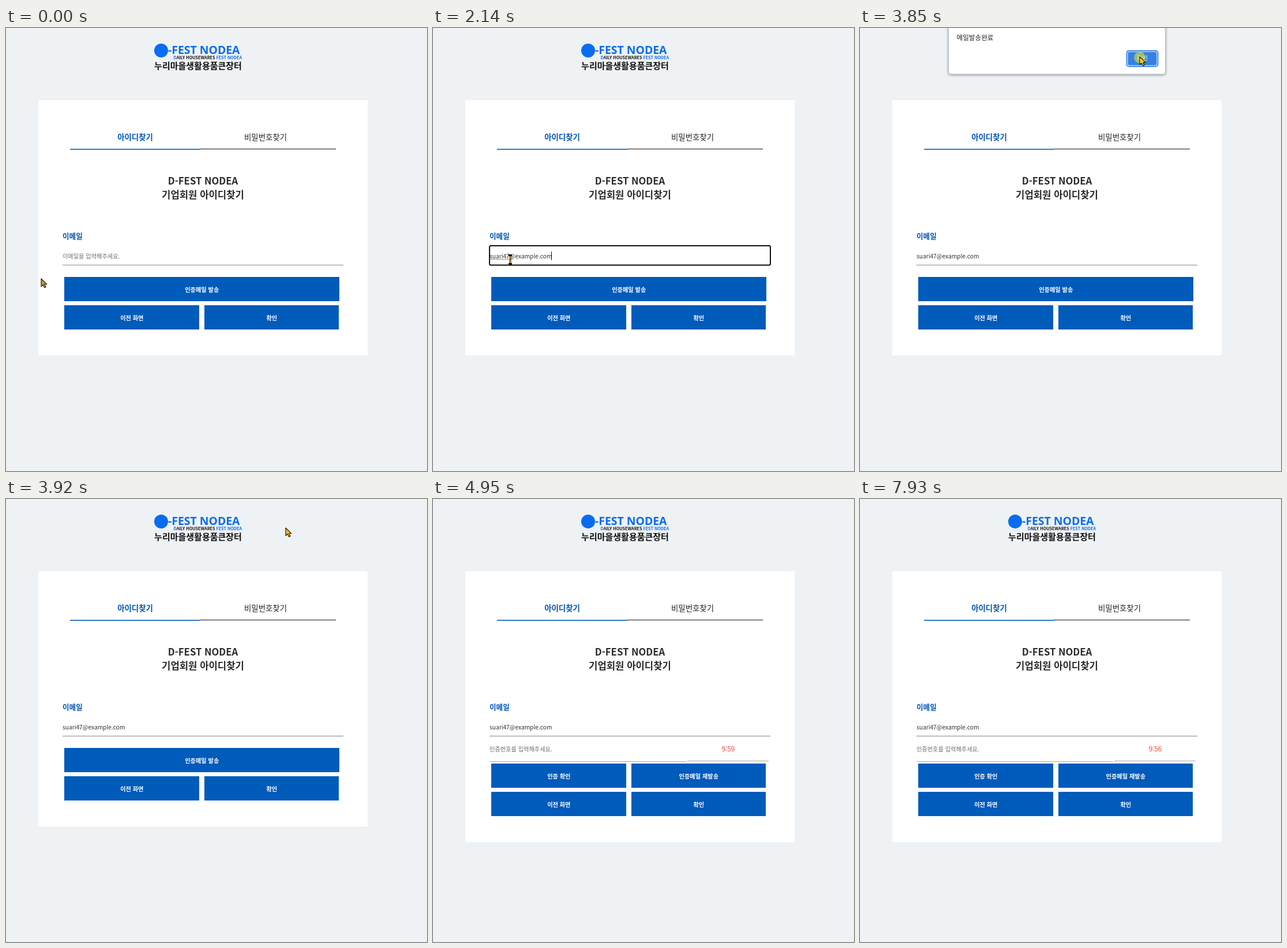
Recreate the animation shown at these times as an HTML page. Size 730x767 px, loop 8 s.

```html
<!DOCTYPE html>
<html lang="ko">
<head>
<meta charset="utf-8">
<title>아이디찾기</title>
<style>
html, body { margin: 0; width: 100%; height: 100%; overflow: hidden; background: #eef2f5; }
svg { display: block; width: 730px; height: 767px; font: 10.2px "Noto Sans CJK KR", "Noto Sans CJK", "Noto Sans", sans-serif; }
.mid { text-anchor: middle; }
.bold { font-weight: 700; }
.blue { fill: #0054b5; }
.head { font-size: 16.7px; font-weight: 600; fill: #2b2b2b; }
.tab { font-size: 13.4px; }
.hint { fill: #6f6f6f; }
.btn rect { fill: #005bbb; }
.btn text { fill: #fff; font-weight: 600; text-anchor: middle; }
.rule { fill: none; stroke: #a9a9a9; }
.pointer { stroke: #1a1408; stroke-width: 1.1; stroke-linejoin: round; }
#dialog { filter: drop-shadow(0 1px 2px rgba(0, 0, 0, .4)); }
</style>
</head>
<body>
<svg viewBox="0 0 730 767">
  <rect width="730" height="767" fill="#eef2f5"/>

  <g id="logo" class="bold">
    <circle cx="269" cy="39" r="12" fill="#0a6cf0"/>
    <text x="281" y="44.5" font-size="19.4" font-family="Noto Sans, sans-serif" fill="#0a6cf0">-FEST NODEA</text>
    <text x="409" y="53.5" font-size="7.2" text-anchor="end" fill="#111"><tspan fill="#0a6cf0">D</tspan>AILY HOUSEWARES <tspan fill="#0a6cf0">FEST NODEA</tspan></text>
    <text class="mid" x="333" y="71.3" font-size="15" fill="#111">누리마을생활용품큰장터</text>
  </g>

  <rect id="card" x="56" y="125" width="571" height="442" fill="#fff"/>
  <text class="mid tab bold blue" x="224" y="193.5">아이디찾기</text>
  <text class="mid tab" x="450" y="193.5" fill="#222">비밀번호찾기</text>
  <rect x="111" y="209.2" width="226" height="1.6" fill="#005bbb"/>
  <rect x="337" y="209" width="235" height="1" fill="#111"/>
  <text class="mid head" x="341.5" y="271">D-FEST NODEA</text>
  <text class="mid head" x="341.5" y="295">기업회원 아이디찾기</text>
  <text class="bold blue" x="98" y="365" font-size="12.6">이메일</text>

  <path class="rule" d="M98 410.5H585" stroke-width="1.4"/>
  <rect id="focus" x="98" y="377" width="487" height="33.5" rx="2.5" fill="#fff" stroke="#101010" stroke-width="2"/>
  <text id="hint" class="hint" x="98" y="398.5">이메일을 입력해주세요.</text>
  <text id="mail" x="98" y="398.5" fill="#333">suari47@example.com</text>
  <path id="spell" d="M98 400.5H136" stroke="#e0402f" stroke-dasharray="2 .6"/>
  <path id="caret" d="M.5 387V402" stroke="#111"/>

  <g id="code">
    <path class="rule" d="M441 453.5H582"/>
    <g id="codeLine">
      <text class="hint" x="98" y="437">인증번호를 입력해주세요.</text>
      <path class="rule" d="M98 454.5H439"/>
    </g>
    <text id="timer" class="mid" x="512" y="437" font-size="11.7" font-weight="300" fill="#e2453c"></text>
  </g>
  <g id="buttons"></g>

  <g id="dialog">
    <rect x="153.5" y="-20" width="376" height="100" rx="4" fill="#fff" stroke="#b9bcc0"/>
    <text x="167.5" y="21.3" font-size="11.6" fill="#222">메일발송완료</text>
    <rect x="462.5" y="39.5" width="54" height="27" rx="3.5" fill="#fff" stroke="#2f7de6" stroke-width="1.8"/>
    <rect id="ok" x="464.5" y="41.5" width="50" height="23" rx="2" fill="#1a73e8"/>
    <text class="mid" x="489.3" y="56" font-size="10.6" fill="#fff">확인</text>
  </g>

  <circle id="press" r="10" fill="#d6db3c"/>
  <g id="cursor">
    <path id="arrow" class="pointer" d="M0 0V13.5L3.2 10.7L5.6 15.6L8 14.4L5.7 9.8H10Z"/>
    <g id="beam" fill="none">
      <path d="M-3-7.5H3M0-7.5V7.5M-3 7.5H3" stroke="#111" stroke-width="3"/>
      <path d="M0-6V6" stroke="#e0b82c" stroke-width="1.3"/>
    </g>
    <path id="hand" class="pointer" fill="#fbbc1d" d="M-.9 1.2Q.4-.9 1.7 1.2V7Q3 5.7 4.2 7.2Q5.5 6.2 6.6 7.8Q8.4 7.2 8.8 9.3V13Q8.4 16 6.8 18H.2Q-2.2 15.5-5.6 11.4Q-5.8 9.2-3.6 9.6L-.9 12Z"/>
  </g>
</svg>
<script>
const $ = id => document.getElementById(id);
const LOOP = 8000, STEP = 70;

// start time, steps, from, control point, to
const moves = [
  [390, 7, [61, 434], [92, 412], [134, 401]],
  [2340, 6, [134, 401], [150, 438], [177, 460]],
  [3250, 7, [177, 460], [340, 240], [485, 50]],
  [4260, 7, [485, 50], [290, 146], [68, 389]]
];

const ease = p => p < .5 ? 4 * p ** 3 : 1 - 4 * (1 - p) ** 3;
const show = (id, on) => { $(id).style.display = on ? "" : "none"; };
const shift = (id, x, y) => $(id).setAttribute("transform", `translate(${x} ${y})`);
const within = (t, a, b) => t >= a && t < b;

function button(x, y, w, label) {
  return `<g class="btn"><rect x="${x}" y="${y}" width="${w}" height="42"/>
    <text x="${x + w / 2 + .3}" y="${y + 25.5}">${label}</text></g>`;
}

$("buttons").innerHTML =
  `<g id="send">${button(101, 431, 477, "인증메일 발송")}</g>
   <g id="verify">${button(101, 431, 234, "인증 확인")}${button(344, 431, 233, "인증메일 재발송")}</g>` +
  button(101, 480, 234, "이전 화면") + button(344, 480, 233, "확인");

function cursorAt(t) {
  let at = moves[0][2];
  for (const [start, steps, a, c, b] of moves) {
    if (t < start) break;
    const s = ease(Math.min(1, (Math.floor((t - start) / STEP) + 1) / steps));
    at = a.map((v, i) => v * (1 - s) ** 2 + 2 * c[i] * s * (1 - s) + b[i] * s * s);
  }
  return at;
}

function drawCursor(t) {
  const [x, y] = cursorAt(t);
  const form = t < 3250;
  const beam = form && x > 98 && y > 377 && y < 411;
  const hand = form && x > 101 && y > 431;
  show("cursor", t < 4950);
  show("beam", beam);
  show("hand", hand);
  show("arrow", !beam && !hand);
  shift("cursor", x, y);
  $("cursor").setAttribute("opacity", t < 4880 ? 1 : .4);
  $("arrow").setAttribute("fill", t < 390 ? "#cb9433" : t < 3720 ? "#fbbc1d" : t < 3920 ? "#ffdc14" : "#fbb81d");

  const click = [1340, 2890, 3720].find(c => within(t, c, c + (c === 3720 ? 200 : 140)));
  show("press", click);
  shift("press", x, y + 1);
  $("press").setAttribute("opacity", click && t - click > 70 ? .62 : .5);
}

function drawForm(t) {
  const focused = within(t, 1340, 2960), filled = t >= 2140;
  show("focus", focused);
  show("hint", !filled);
  show("mail", filled);
  show("spell", focused && filled);
  show("caret", focused && t < 2640);
  shift("caret", filled ? 205 : 98, 0);

  const sent = t >= 3990, ticking = t >= 4880;
  const drop = !sent ? 0 : ticking ? 27 : 44;
  show("send", !sent);
  show("verify", sent);
  show("code", sent);
  shift("buttons", 0, drop);
  shift("codeLine", 0, ticking ? 0 : 17);
  $("card").setAttribute("height", 442 + drop);
  const left = 59 - [5940, 6870, 7930].filter(tick => t >= tick).length;
  $("timer").textContent = ticking ? "9:" + left : "";
}

function drawDialog(t) {
  show("dialog", within(t, 3040, 3920));
  shift("dialog", 0, t < 3110 ? -12 : t < 3180 ? -4 : 0);
  $("dialog").setAttribute("opacity", t < 3110 ? .8 : t < 3180 ? .985 : 1);
  $("ok").setAttribute("fill", t < 3720 ? "#1a73e8" : "#3580e2");
}

function render(t) {
  drawForm(t);
  drawDialog(t);
  drawCursor(t);
}

const begin = performance.now();
function loop() {
  render((performance.now() - begin) % LOOP);
  requestAnimationFrame(loop);
}
loop();
</script>
</body>
</html>
```
